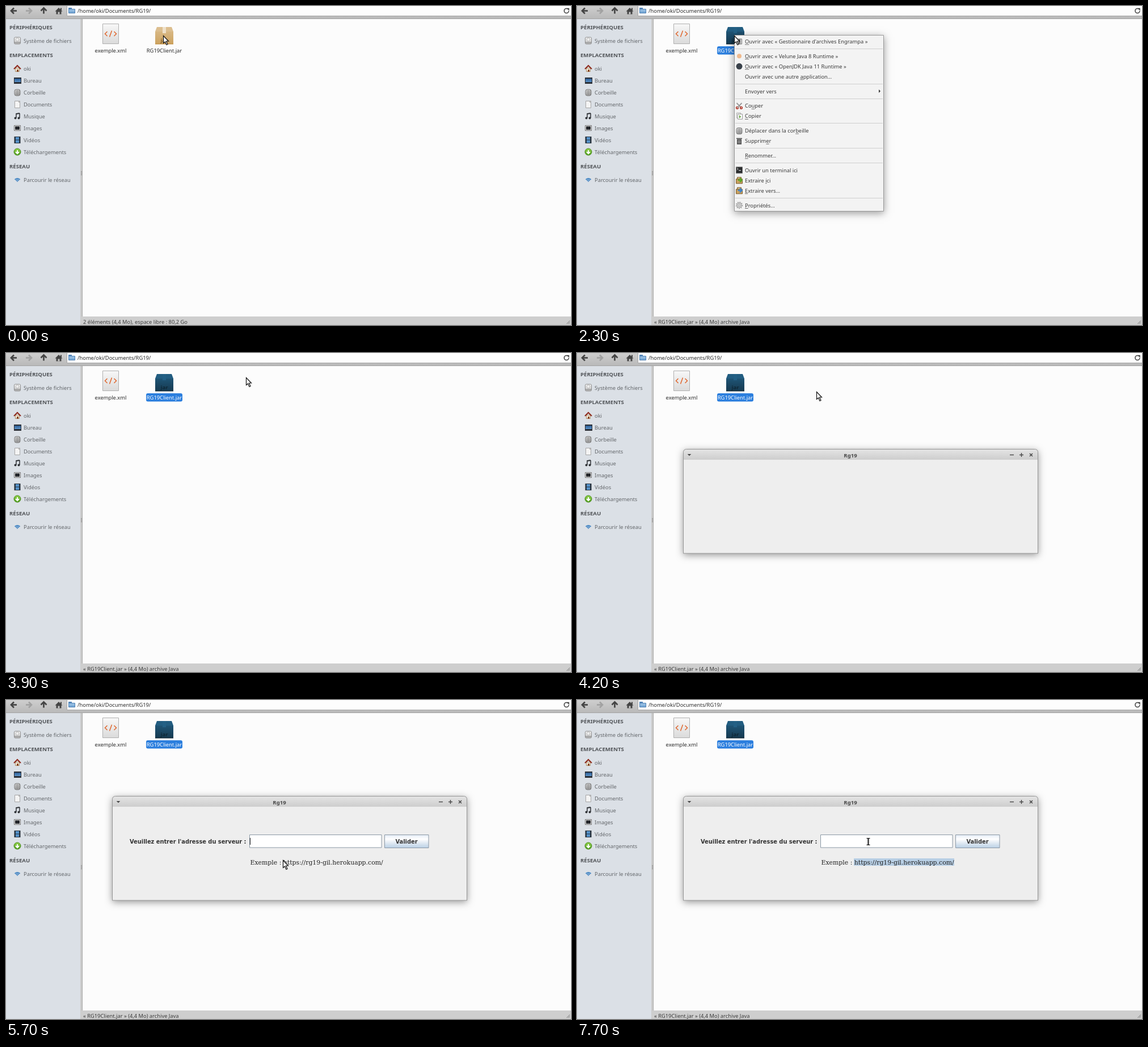
These frames come from a looping animation (996x562 px, 8 s). An HTML page with a canvas:

```html
<!DOCTYPE html>
<html lang="fr">
<head>
<meta charset="utf-8">
<title>Rg19</title>
<style>
html, body { margin: 0; width: 100%; height: 100%; overflow: hidden; background: #fcfcfc; }
canvas { display: block; width: 996px; height: 562px; }
</style>
</head>
<body>
<canvas id="stage" width="996" height="562"></canvas>
<script>
const ctx = document.getElementById('stage').getContext('2d');
const LOOP = 8000;
const UI = '9.33px "Noto Sans", "Open Sans", sans-serif';
const UI_BOLD = 'bold 9.6px "Noto Sans", "Open Sans", sans-serif';
const FORM_BOLD = 'bold 9.85px "DejaVu Sans", sans-serif';
const FORM_SERIF = '10.9px "DejaVu Serif", serif';
const INK = '#444', RIGHT = 0, DOWN = Math.PI / 2, LEFT = Math.PI, UP = -Math.PI / 2;

// ---- drawing helpers ----
function paint(fill, stroke, width = 1) {
  if (fill) { ctx.fillStyle = fill; ctx.fill(); }
  if (stroke) { ctx.strokeStyle = stroke; ctx.lineWidth = width; ctx.stroke(); }
}
function rect(x, y, w, h, fill, stroke) {
  const inset = stroke ? .5 : 0;
  ctx.beginPath();
  ctx.rect(x + inset, y + inset, w - 2 * inset, h - 2 * inset);
  paint(fill, stroke);
}
function round(x, y, w, h, r, fill, stroke) {
  ctx.beginPath(); ctx.roundRect(x, y, w, h, r); paint(fill, stroke);
}
function circle(x, y, r, fill, stroke, width) {
  ctx.beginPath(); ctx.arc(x, y, r, 0, Math.PI * 2); paint(fill, stroke, width);
}
function poly(pts, fill, stroke, width) {
  ctx.beginPath();
  for (let i = 0; i < pts.length; i += 2) ctx.lineTo(pts[i], pts[i + 1]);
  ctx.closePath();
  paint(fill, stroke, width);
}
function line(x0, y0, x1, y1, color, width = 1) {
  ctx.beginPath(); ctx.moveTo(x0, y0); ctx.lineTo(x1, y1); paint(null, color, width);
}
function at(x, y, angle, draw) {
  ctx.save(); ctx.translate(x, y); ctx.rotate(angle); draw(); ctx.restore();
}
function chevron(x, y, r, angle, color, width = 1.5) {
  at(x, y, angle, () => {
    ctx.beginPath(); ctx.moveTo(0, -r); ctx.lineTo(r, 0); ctx.lineTo(0, r);
    paint(null, color, width);
  });
}
function triangle(x, y, r, angle, color) {
  at(x, y, angle, () => poly([0, -r, r, 0, 0, r], color));
}
function arrow(x, y, r, angle, color, width) {
  chevron(x, y, r, angle, color, width);
  at(x, y, angle, () => line(-r, 0, r - 1, 0, color, width));
}
function fade(y0, y1, ...colors) {
  const g = ctx.createLinearGradient(0, y0, 0, y1);
  colors.forEach((c, i) => g.addColorStop(i / (colors.length - 1), c));
  return g;
}
function text(str, x, y, color, font = UI, align = 'left') {
  ctx.font = font; ctx.textAlign = align; ctx.fillStyle = color;
  ctx.fillText(str, x, y + 3.5);
}
function withShadow(alpha, draw) {
  ctx.save();
  ctx.shadowBlur = 13; ctx.shadowOffsetY = 3; ctx.shadowColor = `rgba(0,0,0,${alpha})`;
  draw();
  ctx.restore();
}
// '&' marks the underlined letter that follows it
function mnemonic(label, x, y) {
  const i = label.indexOf('&'), plain = label.replace('&', '');
  text(plain, x, y, '#3a3a3a');
  if (i < 0) return;
  const start = ctx.measureText(plain.slice(0, i)).width;
  rect(x + start, y + 5, ctx.measureText(plain[i]).width, .8, '#4a4a4a');
}

// ---- small icons, drawn around their own centre ----
const icons = {
  disk() {
    round(-5.5, -6, 11, 12, 2, fade(-6, 6, '#fafafa', '#c4c4c4'), '#8d8d8d');
    circle(0, -2, 3, '#ececec', '#b9b9b9');
    rect(-5, 2, 10, 3, '#a9a9a9');
  },
  house() {
    rect(-4, -1, 8, 7, '#f3ead9', '#a88c68');
    rect(-1, 2, 3, 4, '#8a4b22');
    chevron(0, 1, 6, UP, '#8e2a1c', 2);
  },
  desktop() {
    rect(-6, -5, 13, 11, '#2b2f36');
    rect(-5, -3, 11, 6, fade(-3, 3, '#2c5c93', '#5b93c9'));
  },
  trash() {
    round(-5, -5, 10, 11, 3, fade(-5, 6, '#e6e6e6', '#a6a6a6'), '#777');
    for (let x = -2; x < 4; x += 2.5) line(x, -4, x, 5, '#777');
  },
  page() {
    rect(-5, -6, 10, 13, '#f4f4f4', '#a6a6a6');
    rect(2, -6, 3, 3, '#dbdbdb', '#a6a6a6');
  },
  music() {
    for (const x of [-2, 4]) {
      line(x, 3, x, -5, '#2f3236', 1.5);
      circle(x - 1.5, 3.5, 2, '#2f3236');
    }
    line(-2, -4, 4, -5, '#2f3236', 2);
  },
  picture() {
    rect(-6, -5, 12, 10, '#efefef', '#6d6d6d');
    rect(-4, -3, 8, 6, '#25282c');
  },
  film() {
    rect(-5.5, -6, 11, 12, '#27323d');
    for (const y of [-5, .5]) rect(-3, y, 6, 4.5, '#5593cb');
  },
  download() {
    circle(0, 0, 6, fade(-6, 6, '#93d34a', '#4c9a1c'), '#4b8d20');
    arrow(0, 0, 3, DOWN, '#fff', 2);
  },
  wifi() {
    for (let r = 1; r < 8; r += 2.5) {
      ctx.beginPath(); ctx.arc(0, 4, r, -2.4, -.74); paint(null, '#4385c3', 2);
    }
  },
  archive() {
    rect(-5, -5, 10, 10, '#d8d8d8', '#777');
    rect(-1, -4, 3, 8, '#666');
  },
  paleDot() { circle(0, 0, 4, '#efb98d'); },
  darkDot() { circle(0, 0, 5.5, '#39414a'); },
  scissors() {
    for (const side of [-1, 1]) {
      line(4.5 * side, -5, -3 * side, 3, '#959595', 1.8);
      circle(3.5 * side, 3.5, 1.8, null, '#b5372a', 1.6);
    }
  },
  copy() {
    rect(-5, -6, 8, 10, '#f4f4f4', '#aaa');
    rect(-3, -4, 9, 10, '#fbfbfb', '#999');
    triangle(0, 1, 3, RIGHT, '#5da032');
  },
  bin() {
    rect(-4, -3, 8, 9, INK);
    rect(-5, -5, 10, 1.5, INK);
    for (let x = -2; x <= 2; x += 2) line(x, -1.5, x, 4.5, '#d8d8d8', .8);
  },
  terminal() {
    rect(-6, -6, 12, 12, '#2a2c2e', '#6f6f6f');
    chevron(-4, -2, 2, RIGHT, '#eee', 1);
    line(-1, .5, 3, .5, '#eee');
  },
  extract(color = '#5fa52c') {
    rect(-6, -3, 12, 9, '#c9a15f', '#7a5a2c');
    rect(-4, -6, 8, 4, '#e1c083', '#7a5a2c');
    arrow(1, -.5, 3.5, RIGHT, color, 2.5);
  },
  extractTo() { icons.extract('#4384c6'); },
  gear() {
    ctx.setLineDash([2, 1.6]);
    circle(0, 0, 5.4, null, '#9a9a9a', 1.6);
    ctx.setLineDash([]);
    circle(0, 0, 4, '#dedede', '#9a9a9a');
    circle(0, 0, 1.6, '#f4f4f4', '#9a9a9a');
  },
  folder() {
    rect(-6, -5, 6, 4, '#5688bb');
    rect(-6, -3, 12, 8, fade(-3, 5, '#a4c8e8', '#6b9fd0'), '#4d7fb2');
  },
  home() {
    rect(-4.5, 0, 9, 6, INK);
    rect(-1.5, 2, 3, 4, '#c4c4c4');
    triangle(0, 1, 6.5, UP, INK);
    rect(3, -5, 2, 4, INK);
  },
  reload() {
    ctx.beginPath(); ctx.arc(0, 0, 4, 0, Math.PI * 1.7); paint(null, INK, 1.6);
    triangle(2.5, -2.5, 3.3, -Math.PI / 4, INK);
  }
};
const icon = (name, x, y) => at(x, y, 0, () => icons[name]());

// ---- file manager ----
const sidebarGroups = {
  'PÉRIPHÉRIQUES': { 'Système de fichiers': 'disk' },
  'EMPLACEMENTS': {
    oki: 'house', Bureau: 'desktop', Corbeille: 'trash', Documents: 'page', Musique: 'music',
    Images: 'picture', 'Vidéos': 'film', 'Téléchargements': 'download'
  },
  'RÉSEAU': { 'Parcourir le réseau': 'wifi' }
};

function toolbar() {
  rect(0, 0, 996, 23, fade(0, 22, '#cecece', '#b9b9b9'));
  rect(0, 22, 996, 1, '#a4a4a4');
  arrow(14, 8.5, 5, LEFT, INK, 2.7);
  arrow(40, 8.5, 5, RIGHT, '#a2a2a2', 2.7);
  arrow(66.5, 8.5, 5, UP, INK, 2.7);
  icon('home', 93, 8.5);
  rect(107, -2, 890, 20, '#fdfdfd', '#a6a6a6');
  icon('folder', 116, 8);
  text('/home/oki/Documents/RG19/', 126, 8, '#2c2c2c');
  icon('reload', 988, 8.5);
}

function sidebar() {
  rect(0, 23, 132, 539, '#dbe0e6');
  rect(131, 23, 4, 539, '#cbcbcb');
  rect(134, 23, 1, 524, '#a9a9a9');
  for (let y = 291; y < 298; y += 2) rect(132, y, 2, 1, '#8f8f8f');
  let y = 37;
  for (const [heading, places] of Object.entries(sidebarGroups)) {
    text(heading, 6, y, '#505357', UI_BOLD);
    y += 24;
    for (const [label, name] of Object.entries(places)) {
      icon(name, 20, y);
      text(label, 31, y, '#63666a');
      y += 21;
    }
    y += 4;
  }
}

function xmlFile() {
  rect(170, 31, 29, 36, fade(31, 67, '#f8f8f8', '#dadada'), '#b0b0b0');
  chevron(178.5, 49, 4, LEFT, '#e0672f');
  line(186.5, 43.5, 182.5, 54.5, '#e0672f', 1.5);
  chevron(190.5, 49, 4, RIGHT, '#e0672f');
  text('exemple.xml', 184.5, 78, '#2a2a2a', UI, 'center');
}

function jarFile(selected, hovered) {
  const light = !selected ? 68 : hovered ? 35 : 29;
  const tone = d => selected ? `hsl(203 58% ${light + d}%)` : `hsl(37 52% ${light + d}%)`;
  at(279, 37, 0, () => {
    rect(-16, 8, 32, 22, fade(8, 30, tone(0), tone(-9)));
    poly([-13, 0, 13, 0, 16, 8, -16, 8], tone(3));
    rect(-3, 0, 6, 11, tone(selected ? 4 : 18));
    rect(-16, 29, 32, 1.5, tone(-16));
  });
  text('jar', 279, 60, tone(selected ? -15 : -35), UI_BOLD, 'center');
  if (selected) round(247, 71, 64, 14.5, 3, '#2c7fde');
  text('RG19Client.jar', 279, 78, selected ? '#fff' : '#2a2a2a', UI, 'center');
}

function statusBar(message) {
  rect(132, 547, 864, 15, '#cecece');
  text(message, 136, 556, '#3a3a3a');
  for (let i = 2; i <= 6; i += 2) line(994 - i, 560, 994, 560 - i, '#8d8d8d');
}

// ---- context menu ----
const menuGroups = [
  [['archive', "&Ouvrir avec « Gestionnaire d'archives Engrampa »"]],
  [['paleDot', '&Ouvrir avec « Velune Java 8 Runtime »'],
   ['darkDot', '&Ouvrir avec « OpenJDK Java 11 Runtime »'],
   [null, 'Ouvrir avec une autre &application...']],
  [[null, 'Envoyer vers', 'submenu']],
  [['scissors', 'Co&uper'], ['copy', '&Copier']],
  [['trash', 'Déplacer dans la cor&beille'], ['bin', 'Supprim&er']],
  [[null, '&Renommer...']],
  [['terminal', 'Ouvrir un terminal ici'], ['extract', 'Extraire &ici'], ['extractTo', '&Extraire vers...']],
  [['gear', '&Propriétés...']]
];
function contextMenu() {
  withShadow(.4, () => rect(277, 51, 264, 311, '#f3f3f3'));
  rect(277, 51, 264, 311, '#f3f3f3', '#989898');
  let y = 62.5;
  menuGroups.forEach((group, i) => {
    if (i) {
      rect(279, Math.round(y - 13.3), 260, 1, '#cfcfcf');
    }
    for (const [name, label, submenu] of group) {
      if (name) icon(name, 286, y);
      mnemonic(label, 296, y);
      if (submenu) triangle(532, y, 3, RIGHT, '#3a3a3a');
      y += 18.05;
    }
    y += 7.7;
  });
}

// ---- application window ----
function appWindow() {
  const corners = [5, 5, 0, 0], frame = [187.5, 169.5, 625, 183.5, corners];
  withShadow(.42, () => round(...frame, '#eee'));
  round(187.5, 169.5, 625, 19, corners, fade(170, 188, '#e4e4e4', '#cdcdcd'));
  rect(188, 188, 624, 165, '#eee');
  round(...frame, null, '#959595');
  triangle(198, 178, 3.3, DOWN, INK);
  text('Rg19', 482, 180, '#4a4a4a', UI_BOLD, 'center');
  const cross = angle => at(0, 0, angle, () => line(-3.5, 0, 3.5, 0, INK, 1.4));
  at(766.5, 179.5, 0, () => cross(0));
  at(783.5, 179.5, 0, () => { cross(0); cross(DOWN); });
  at(800.5, 179.5, Math.PI / 4, () => { cross(0); cross(DOWN); });
}

function form(caretOn, selectionEnd) {
  text("Veuillez entrer l'adresse du serveur :", 218, 249.5, '#333', FORM_BOLD);
  rect(429, 237, 233.5, 23.5, '#fff', '#8b98a5');
  rect(667, 237, 78.5, 24, fade(237, 261, '#e2ebf5', '#fff', '#dbe6f1', '#b8cfe5'), '#8b98a5');
  text('Valider', 706, 249.5, '#333', FORM_BOLD, 'center');
  if (caretOn) rect(430, 243, 1, 12, '#333');
  if (selectionEnd) rect(488, 279, selectionEnd - 488, 13, '#b8cfe5');
  text('Exemple : https://rg19-gil.herokuapp.com/', 430.5, 286, '#222', FORM_SERIF);
}

const stops = [
  [3200, 277, 52], [3450, 294, 80], [3700, 324, 72], [3950, 423, 43], [4200, 422, 68],
  [4700, 500, 176], [5200, 506, 265], [5700, 488, 282], [5950, 528, 282], [6200, 655, 291],
  [7200, 665, 286], [7450, 514, 249], [7700, 510, 243]
];
const CAPTURE = 250;

function pointerAt(t) {
  const seen = Math.floor((t - 150) / CAPTURE) * CAPTURE + 200;
  const next = stops.findIndex(stop => stop[0] > seen);
  if (next === 0) return stops[0].slice(1);
  if (next < 0) return stops.at(-1).slice(1);
  const [t0, x0, y0] = stops[next - 1], [t1, x1, y1] = stops[next];
  const k = (seen - t0) / (t1 - t0);
  return [x0 + (x1 - x0) * k, y0 + (y1 - y0) * k];
}

function textBeam() {
  for (const [color, width] of [['#fff', 2.6], ['#111', 1.2]]) {
    for (const x of [3, 4]) line(x, 1, x, 12, color, width);
    for (const y of [.7, 12.3]) line(.5, y, 6.5, y, color, width);
  }
}
function arrowPointer() {
  poly([.5, .5, .5, 13.5, 3.5, 11, 6, 16.5, 8, 15.5, 5.5, 10, 9.5, 10], '#fff', '#111', 1.2);
}

function draw(t) {
  const selected = t >= 1200;
  const menuOpen = t >= 2300 && t < 3400;
  const overField = t >= 7400;
  const [x, y] = pointerAt(t);
  rect(0, 0, 996, 562, '#fcfcfc');
  toolbar();
  sidebar();
  statusBar(selected ? '« RG19Client.jar » (4,4 Mo) archive Java' : '2 éléments (4,4 Mo), espace libre : 80,2 Go');
  xmlFile();
  jarFile(selected, t < 3900 && !menuOpen);
  if (menuOpen) contextMenu();
  if (t >= 4200) appWindow();
  if (t >= 4500) {
    const caretOn = t < 6000 && Math.floor(t / 500) % 2 === 1;
    form(caretOn, t < 6000 ? 0 : overField ? 665 : x);
  }
  at(x, y, 0, overField ? textBeam : arrowPointer);
}

const start = performance.now();
function tick() {
  draw((performance.now() - start) % LOOP);
  requestAnimationFrame(tick);
}
tick();
</script>
</body>
</html>
```
